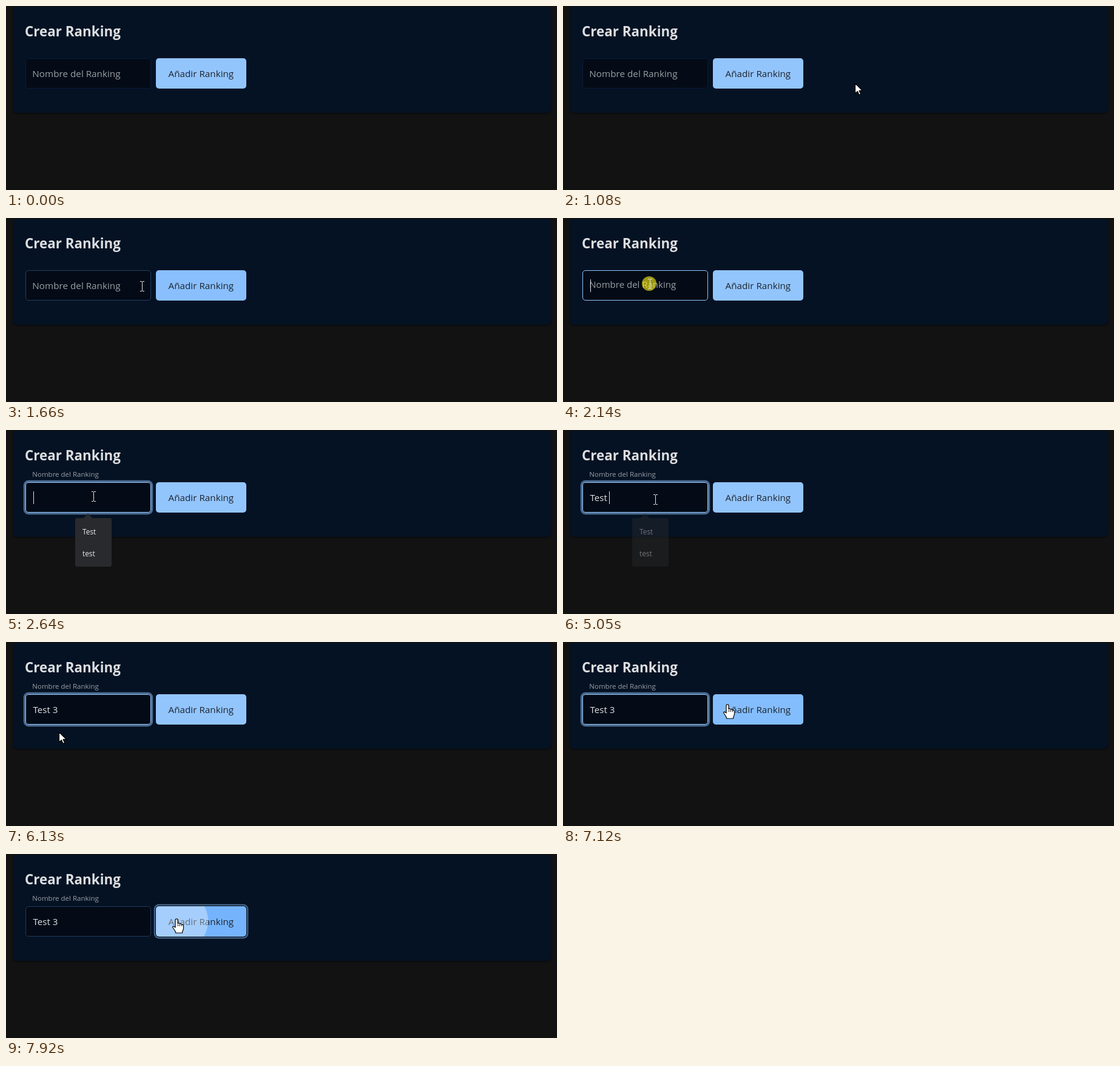
An HTML page with a canvas for the animation above (8 s loop, 908 by 303 pixels).

```html
<!DOCTYPE html>
<html lang="es">
<head>
<meta charset="utf-8">
<title>Crear Ranking</title>
<style>
  html, body { margin: 0; width: 100%; height: 100%; overflow: hidden; background: #121212; }
  canvas { display: block; width: 908px; height: 303px; }
</style>
</head>
<body>
<canvas id="stage"></canvas>
<script>
const W = 908, H = 303, LOOP = 8000;
const canvas = document.getElementById('stage');
const ctx = canvas.getContext('2d');
const dpr = window.devicePixelRatio || 1;
canvas.width = W * dpr;
canvas.height = H * dpr;

const FONT = '"Open Sans", "Noto Sans", sans-serif';
const CARD = [5, 18, 35], PRIMARY = [147, 197, 253];
const INPUT = { x: 32, y: 86, w: 207, h: 50 };
const BUTTON = { x: 247, y: 86, w: 149, h: 50 };
const FOCUS = 2120, PRESS = 7810;

// Pointer way-points: time, x, y
const PATH = [
  [100, 864, 296], [300, 800, 247], [500, 715, 187], [840, 602, 141], [940, 602, 141],
  [1080, 481, 127], [1300, 380, 118], [1740, 190, 111], [2100, 143, 108], [2560, 143, 108],
  [3200, 152, 114], [5700, 152, 114], [6130, 87, 148], [6470, 229, 70], [6570, 229, 70],
  [7120, 271, 103], [7400, 271, 103], [7800, 281, 107], [8000, 281, 107]
];
// Keystrokes: time, field content
const KEYS = [[3800, 'T'], [4050, 'Te'], [4220, 'Tes'], [4500, 'Test'], [5030, 'Test '], [5200, 'Test 3']];
const BLINK = 530;

const clamp = v => Math.max(0, Math.min(1, v));
const ramp = (t, from, to) => clamp((t - from) / (to - from));
const ease = p => p * p * (3 - 2 * p);
const lerp = (a, b, p) => a + (b - a) * p;
const mix = (a, b, p) => a.map((v, i) => lerp(v, b[i], p));
const rgb = (c, a = 1) => `rgba(${c.map(Math.round).join(',')},${a})`;
const inside = (p, b) => p.x >= b.x && p.x <= b.x + b.w && p.y >= b.y && p.y <= b.y + b.h;

function pointer(t) {
  if (t < PATH[0][0]) return { x: W + 50, y: H + 50 };
  const i = Math.max(1, PATH.findIndex(k => k[0] >= t));
  const a = PATH[i - 1], b = PATH[i], p = ramp(t, a[0], b[0]);
  return { x: lerp(a[1], b[1], p), y: lerp(a[2], b[2], p) };
}

// Share of the last 200 ms spent over a box: a linear hover transition
function hover(t, box) {
  let n = 0;
  for (let i = 0; i < 20; i++) n += inside(pointer(t - i * 10), box);
  return n / 20;
}

function rounded(b, r, grow = 0) {
  ctx.beginPath();
  ctx.roundRect(b.x - grow, b.y - grow, b.w + 2 * grow, b.h + 2 * grow, r + grow);
}

function fillBox(b, r, color, grow) {
  rounded(b, r, grow);
  ctx.fillStyle = color;
  ctx.fill();
}

function text(str, x, y, size, color, weight = 400) {
  ctx.font = `${weight} ${size}px ${FONT}`;
  ctx.fillStyle = color;
  ctx.fillText(str, x, y);
}

function drawCard() {
  ctx.fillStyle = '#121212';
  ctx.fillRect(0, 0, W, H);
  const card = { x: 12, y: 1, w: 886, h: 175 };
  ctx.save();
  ctx.shadowColor = 'rgba(0,0,0,.55)';
  ctx.shadowBlur = 3 * dpr;
  ctx.shadowOffsetY = dpr;
  fillBox(card, 6, rgb(CARD));
  ctx.restore();
  text('Crear Ranking', 31, 50, 22.4, '#dcdee1', 700);
}

function caretOn(t, typed) {
  if (t < FOCUS || t >= PRESS) return false;
  if (t < 3800) return t < 2650 || (t >= 2910 && t < 3440);
  return Math.floor((t - typed) / BLINK) % 2 === 0;
}

function drawInput(t) {
  const ring = ramp(t, FOCUS + 20, FOCUS + 220) * (1 - ramp(t, PRESS, 7915));
  const focused = t >= FOCUS && t < PRESS;
  const glow = focused ? 1 : t >= PRESS ? lerp(1, 0.17, ramp(t, PRESS, 7920)) : hover(t, INPUT);
  if (ring) {
    fillBox(INPUT, 5, rgb(PRIMARY, 0.5 * ring), 3.2 * ring);
  }
  fillBox(INPUT, 5, rgb([4, 11, 22]));
  rounded(INPUT, 5, -0.5);
  ctx.strokeStyle = rgb(mix([8, 28, 60], PRIMARY, glow));
  ctx.lineWidth = 1;
  ctx.stroke();

  const up = ease(ramp(t, FOCUS - 25, FOCUS + 280));
  text('Nombre del Ranking', 43.3, lerp(117, 77, up), lerp(15.25, 11.5, up), '#9a9fa5');

  const key = KEYS.filter(k => k[0] <= t).pop();
  const value = key ? key[1] : '';
  text(value, 44.5, 117, 15.1, '#dfe1e4');
  if (caretOn(t, key ? key[0] : 0)) {
    const x = Math.round(45 + ctx.measureText(value).width - (value ? 1 : 0));
    ctx.fillStyle = '#dfe1e4';
    ctx.fillRect(x, 101, 1, 21);
  }
}

function drawButton(t) {
  const press = ramp(t, PRESS, 7920);
  if (press) {
    fillBox(BUTTON, 5, rgb(PRIMARY, 0.55 * press), 3.2 * press);
    fillBox(BUTTON, 5, '#101a28', 1.5 * press);
  }
  const over = mix(PRIMARY, [132, 189, 253], hover(t, BUTTON));
  fillBox(BUTTON, 5, rgb(mix(over, [117, 180, 252], press)));
  text('Añadir Ranking', 267.5, 117, 15.25, '#1c2530');
  if (press) {
    ctx.save();
    rounded(BUTTON, 5);
    ctx.clip();
    ctx.beginPath();
    ctx.arc(282, 110, 51 * press, 0, 7);
    ctx.fillStyle = 'rgba(255,255,255,.35)';
    ctx.fill();
    ctx.restore();
  }
}

function drawSuggestions(t) {
  if (t < 2500 || t > 5180) return;
  ctx.globalAlpha = 1 - ramp(t, 4880, 5180);
  ctx.beginPath();
  ctx.moveTo(127, 145.5);
  ctx.lineTo(135, 137.5);
  ctx.lineTo(143, 145.5);
  ctx.fillStyle = '#292a2d';
  ctx.fill();
  fillBox({ x: 114, y: 145, w: 60, h: 80 }, 3, '#292a2d');
  text('Test', 126, 172, 11.9, '#e8eaed');
  text('test', 126, 208, 11.9, '#e8eaed');
  ctx.globalAlpha = 1;
}

function shape(d, x, y) {
  const path = new Path2D(d);
  ctx.save();
  ctx.translate(Math.round(x), Math.round(y));
  ctx.lineJoin = 'round';
  ctx.lineWidth = 1.2;
  ctx.strokeStyle = '#000';
  ctx.fillStyle = '#fff';
  ctx.fill(path);
  ctx.stroke(path);
  ctx.restore();
}

const ARROW = 'M.5 .5V17L4.4 13.4L7 19.2L9.6 18L7.1 12.4H12.3Z';
const HAND = 'M-2 1.5C-2-.8 2-.8 2 1.5V7.6C2.6 6.6 5.2 6.8 5.5 8.4C6.3 7.5 8.6 7.9 8.8 9.4'
  + 'C9.8 8.8 11.5 9.3 11.5 11V15.5C11.5 18 9.6 19.4 9.5 23H-1.2C-1.4 20-4 17.4-6 14.2'
  + 'C-7.2 12-4.4 11-2 14Z';

function drawBeam(x, y) {
  ctx.save();
  ctx.translate(Math.round(x), Math.round(y));
  ctx.fillStyle = '#e6e6e6';
  ctx.fillRect(0, -7, 1, 15);
  for (const end of [-8, 8]) {
    ctx.fillRect(-3, end, 3, 1);
    ctx.fillRect(1, end, 3, 1);
  }
  ctx.restore();
}

function drawPointer(t) {
  const p = pointer(t);
  if (t >= 2090 && t < 2260) {
    ctx.beginPath();
    ctx.arc(142, 108, 12, 0, 7);
    ctx.fillStyle = 'rgba(250,238,20,.62)';
    ctx.fill();
  }
  if (inside(p, INPUT)) drawBeam(p.x, p.y);
  else if (inside(p, BUTTON)) {
    shape(HAND, p.x, p.y);
    ctx.fillStyle = '#000';
    for (const dx of [2, 5, 8]) ctx.fillRect(Math.round(p.x) + dx, Math.round(p.y) + 9, 1, 3);
  } else shape(ARROW, p.x, p.y);
}

function draw(t) {
  ctx.setTransform(dpr, 0, 0, dpr, 0, 0);
  drawCard();
  drawButton(t);
  drawInput(t);
  drawSuggestions(t);
  drawPointer(t);
}

const start = performance.now();
function tick() {
  draw((performance.now() - start) % LOOP);
  requestAnimationFrame(tick);
}
tick();
</script>
</body>
</html>
```
